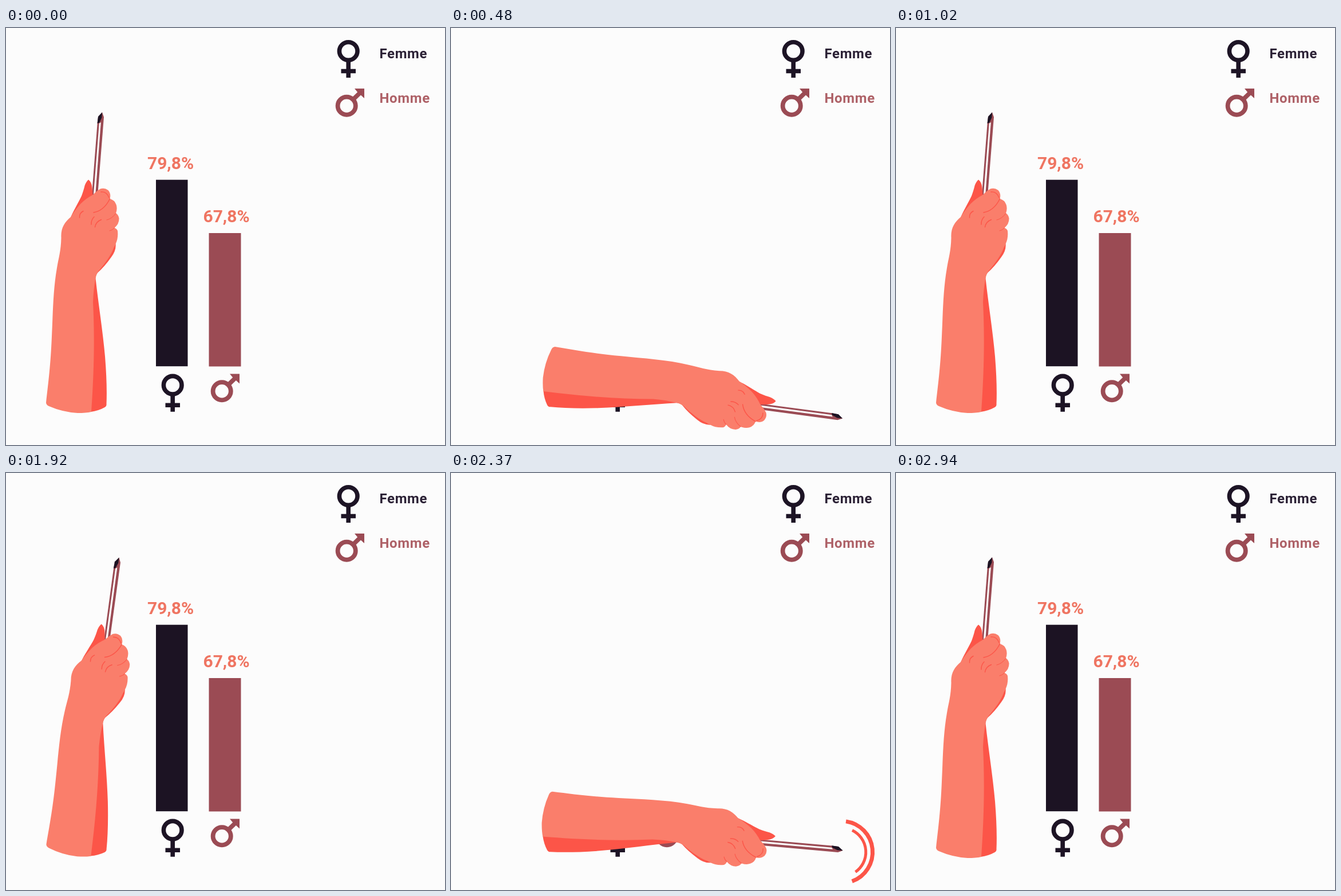
An HTML page for the animation above (3.6 s loop, 767 by 730 pixels).

```html
<!DOCTYPE html>
<html lang="fr">
<head>
<meta charset="utf-8">
<style>
  html, body { margin: 0; width: 100%; height: 100%; overflow: hidden; background: #fcfcfc; }
  svg { display: block; width: 767px; height: 730px; }
  text { font-family: Roboto, Arial, sans-serif; font-weight: 700; }
  .value { font-size: 30px; fill: #ef7562; text-anchor: middle; }
  .legend { font-size: 24px; letter-spacing: .65px; }
  .line { fill: none; stroke: #fc5548; stroke-width: 1.4; stroke-linecap: round; }
  .wave { fill: none; stroke: #fc5548; }
</style>
</head>
<body>
<svg viewBox="0 0 767 730">
  <defs>
    <g id="female" fill="none" stroke="#1d1425" stroke-width="7.600">
      <circle cx="598.200" cy="40.500" r="15.800"/>
      <path d="M598.200 57V87M585.500 75.500H611"/>
    </g>
    <g id="male">
      <g fill="none" stroke="#9b4b54" stroke-width="7.800">
        <circle cx="595.200" cy="136.300" r="15.600"/>
        <path d="M606 125.500L620 112"/>
      </g>
      <path d="M609 106H626V123L620.500 118L613.500 111.500Z" fill="#9b4b54"/>
    </g>
    <!-- everything clockwise of the arm stays visible -->
    <clipPath id="wipe">
      <path class="turn" d="M120 1500V400L155 285L166 148L300 -1500H3000V1500Z"/>
    </clipPath>
  </defs>

  <use href="#female"/>
  <use href="#male"/>
  <text class="legend" x="652.500" y="53" fill="#2b2135">Femme</text>
  <text class="legend" x="652.500" y="131" fill="#ae6167">Homme</text>

  <use href="#female" x="-307" y="584.700"/>
  <use href="#male" x="-218" y="499.500"/>

  <g clip-path="url(#wipe)">
    <rect x="262" y="265.700" width="55.500" height="326.500" fill="#1c1323"/>
    <rect x="354.500" y="359" width="56" height="233.500" fill="#9b4b54"/>
    <text class="value" x="287.500" y="247">79,8%</text>
    <text class="value" x="385" y="340">67,8%</text>
  </g>

  <g class="turn">
    <path id="outer" class="wave"/>
    <path id="inner" class="wave"/>

    <!-- pencil -->
    <path d="M159.700 166L161 156L168 147.500L171 156L160.200 292H150Z" fill="#9b4b54"/>
    <path d="M162.800 167L165.800 165L156.300 291H153Z" fill="#fcfcfc"/>
    <path d="M159.500 167L161 155L168 147.500L167.300 157L163 166Z" fill="#1c1323"/>

    <!-- shaded thumb and underside -->
    <g fill="#fc5548">
      <path d="M112 334C117 321 127 305 132 294Q136 283 137.500 276Q140 269 144 265.500Q150 270 150.500 280L152 297L130 325Z"/>
      <path d="M186 380L191.500 377Q193 389 184 401Q172 418 160.500 428Q157 432 156.500 438C161 480 169 530 173 575Q177 625 175.500 658Q176 662 172.500 664Q162 670 148 672L140 560L146 440Z"/>
    </g>
    <path fill="#fa7e6b" d="M113 331C102 340 95.500 351 96.500 367C96 390 92 402 89 420C82 460 82 500 80 540C78 590 74 620 70 656Q70.500 660 75 662Q99 672.500 125 674Q140 674 149 672C154 600 155 540 152 480Q153 455 156.500 438Q158 430 162 425C174 411 184 397 188.500 384Q190.500 381 191.500 378Q196.500 368 195 355Q193.500 351 189.500 350Q198 343 197.500 333Q196 326 192 324.500Q195 316 192.500 309Q189.500 301 181.500 299Q184 290 178.500 284Q172 279 165 281.500Q157 286 152 292Q140 298 130 308Q118 322 113 331Z"/>
    <g class="line">
      <path d="M128.500 332Q128 324 135 320.500"/>
      <path d="M149 344Q148.500 336 154 330.500"/>
      <path d="M155.500 348.500Q157 339 166.500 335.500"/>
      <path d="M153 323Q171 320 181.500 299"/>
      <path d="M166 287Q176 286 180 297"/>
      <path d="M176 336Q185 334 192 324.500" stroke-width="1"/>
      <path d="M181 355Q186 354 189.500 350" stroke-width="1"/>
    </g>
  </g>
</svg>

<script>
const LOOP = 3600, STEP = 30, SPEED = 0.194, RAMP = 75;
const PIVOT = "172.2 659.900";

// arm swings: start, end; wave pulses: on, off
const swings = [
  { start: 0, end: 1020, on: 200, off: 450 },
  { start: 1903, end: 2940, on: 2108, off: 2632 }
];
const turning = document.querySelectorAll(".turn");
const inner = document.getElementById("inner");
const outer = document.getElementById("outer");

function arc(r, mid, span) {
  const at = deg => {
    const a = deg * Math.PI / 180;
    return `${170.600 + r * Math.sin(a)} ${149.800 - r * Math.cos(a)}`;
  };
  return `M${at(mid - span / 2)}A${r} ${r} 0 0 1 ${at(mid + span / 2)}`;
}
inner.setAttribute("d", arc(42.5, -5, 119));
outer.setAttribute("d", arc(54.3, -6.4, 152));

const pulse = (t, on, off) =>
  Math.max(0, Math.min(1, (t - on) / RAMP, (off - t) / RAMP));

function setWave(el, width) {
  el.style.strokeWidth = width;
  el.style.visibility = width > 0 ? "visible" : "hidden";
}

function draw(now) {
  const t = Math.floor((now % LOOP) / STEP) * STEP;
  let angle = 0, thin = 0, thick = 0;
  for (const s of swings) {
    angle = Math.max(angle, SPEED * Math.min(t - s.start, s.end - t));
    thin = Math.max(thin, 5 * pulse(t, s.on, s.off));
    thick = Math.max(thick, 7 * pulse(t, s.on + 25, s.off - 25));
  }
  for (const el of turning) el.setAttribute("transform", `rotate(${angle} ${PIVOT})`);
  setWave(inner, thin);
  setWave(outer, thick);
}

const begin = performance.now();
function tick() {
  draw(performance.now() - begin);
  requestAnimationFrame(tick);
}
tick();
</script>
</body>
</html>
```
